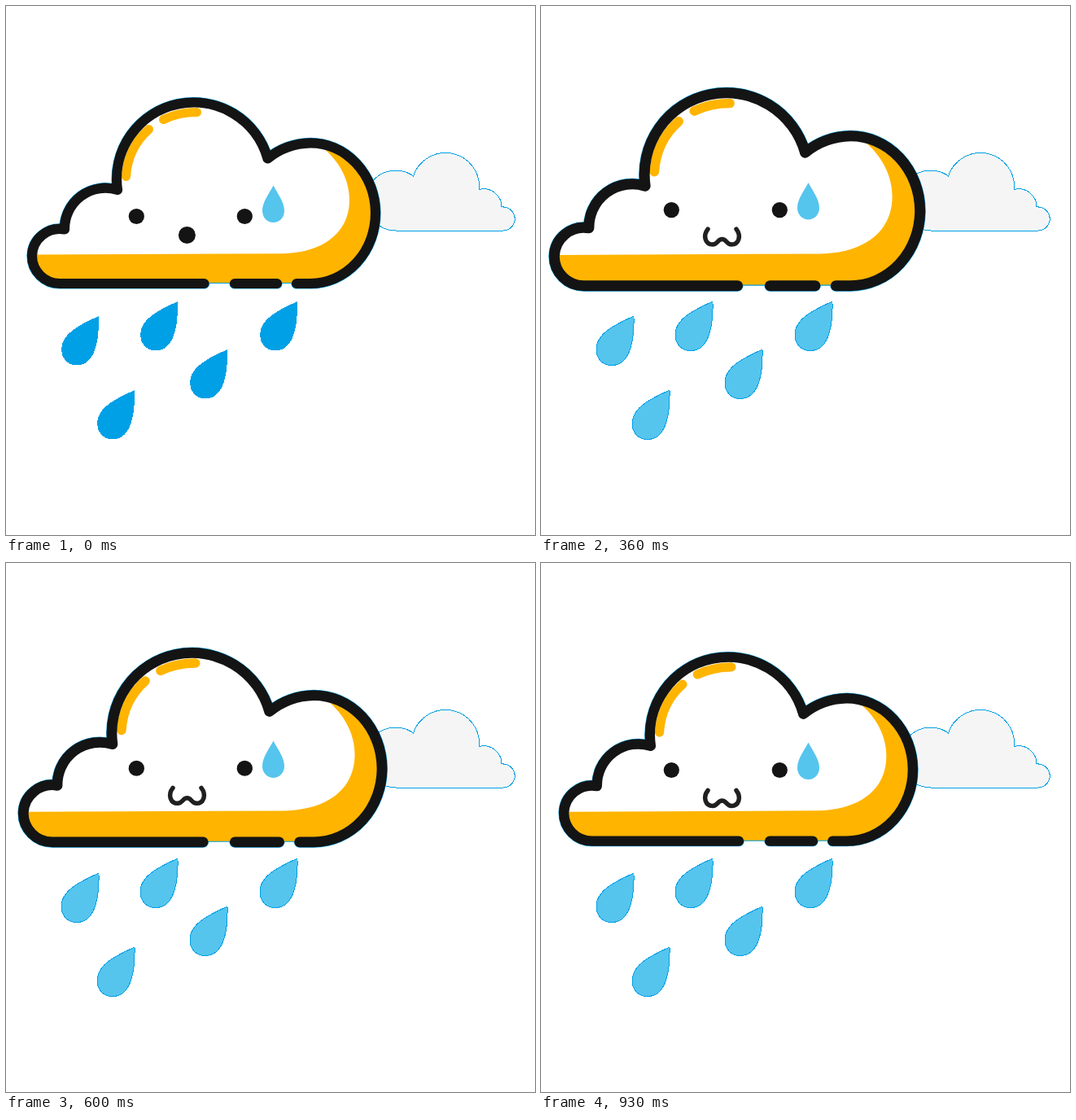
An HTML page that plays this animation: 650 px wide and 650 px high, repeating every 1200 ms.

```html
<!DOCTYPE html>
<html lang="en">
<head>
<meta charset="utf-8">
<title>Rain cloud</title>
<style>
  html, body { margin: 0; width: 100%; height: 100%; overflow: hidden; background: #fff; }
  svg { display: block; width: 100%; height: 100%; }
</style>
</head>
<body>
<svg viewBox="0 0 650 650" stroke-linecap="round" stroke-linejoin="round">
  <defs>
    <path id="drop" d="M114 381C92 391 68 402 68 422C68 434 76 441.5 87 441.5C104 441.5 115 424 114 381Z"/>
    <path id="body" d="M66 340.5A34 34 0 0 1 32 307A34 34 0 0 1 72 274.5A50 50 0 0 1 137 226A94.45 94.45 0 0 1 321.5 187.5A86 86 0 0 1 374 168.4A80 86.5 0 0 1 454 254A80 86.5 0 0 1 374 340.5Z"/>
    <path id="line" d="M357 341H374A80 86.5 0 0 0 454 254A80 86.5 0 0 0 374 168.4A86 86 0 0 0 321.5 187.5A94.45 94.45 0 0 0 137 226A50 50 0 0 0 72 274.5A34 34 0 0 0 32 307A34 34 0 0 0 66 341H243.5M281 341H333"/>
    <clipPath id="inside"><use href="#body"/></clipPath>
  </defs>

  <path fill="#f5f5f5" stroke="#00a0e6" shape-rendering="crispEdges" d="M479 276A37 37 0 1 1 500.5 209A41.62 41.62 0 0 1 581.5 225.5A22 22 0 0 1 609 247A14.55 14.55 0 1 1 611 276Z"/>

  <g id="cloud">
    <use href="#line" fill="none" stroke="#00a0e6" stroke-width="13.2"/>
    <use href="#body" fill="#ffb400" stroke="#00a0e6"/>
    <path fill="#fff" clip-path="url(#inside)" d="M20 305.6L340 304.2C388 303 422 280 422 238C422 213 409 190 389 174L370 100H20Z"/>
    <path fill="none" stroke="#ffb400" stroke-width="11" d="M147.5 209.5C149 186 159 166 175.5 151.5M193.5 139.5C206 133.5 220 130.5 234.5 130.5"/>
    <use href="#line" fill="none" stroke="#141414" stroke-width="12.2"/>
  </g>

  <g id="eyes" fill="#141414">
    <circle cx="160.3" cy="258.5" r="9.6"/>
    <circle cx="293.3" cy="258.5" r="9.6"/>
  </g>
  <path id="tear" fill="#55c5ee" d="M328.5 220.5C323 231 315 241 315 251.5C315 260 321 266 328.5 266C336 266 342 260 342 251.5C342 241 334 231 328.5 220.5Z"/>
  <circle id="gasp" cx="222.4" cy="281.5" fill="#141414"/>
  <path id="smile" fill="none" stroke="#202020" stroke-width="5.5" d="M205 279.5C198.5 288 202 298.5 211 298.5C217 298.5 217 292 222.5 292C228 292 228 298.5 234 298.5C243 298.5 246.5 288 240 279.5"/>

  <g id="rain" shape-rendering="crispEdges">
    <use href="#drop"/>
    <use href="#drop" x="97" y="-18"/>
    <use href="#drop" x="244" y="-18"/>
    <use href="#drop" x="158" y="41"/>
    <use href="#drop" x="44" y="91"/>
  </g>
</svg>
<script>
  const LOOP = 1200, STEP = 30, PEAK = 300, END = 930;
  const [cloud, eyes, tear, gasp, smile, rain] =
    ["cloud", "eyes", "tear", "gasp", "smile", "rain"].map(id => document.getElementById(id));

  const shiftY = (el, y) => el.setAttribute("transform", `translate(0 ${y})`);

  function draw(now) {
    const t = Math.min(Math.floor(now % LOOP / STEP) * STEP, END);
    const rising = t < PEAK;
    const up = t / PEAK, down = (t - PEAK) / (END - PEAK);
    // Rise from 0 to the peak, then settle to the resting value
    const move = (peak, rest) => rising ? peak * up : peak + (rest - peak) * down;

    const scale = 1 + move(0.07, 0.016);
    cloud.setAttribute("transform", `translate(274 300) scale(${scale}) translate(-274 -300)`);
    shiftY(eyes, move(-8.3, -4));
    shiftY(tear, move(-4, 0));

    gasp.setAttribute("r", 10.5 + 8 * up);
    gasp.setAttribute("visibility", rising ? "visible" : "hidden");
    smile.setAttribute("visibility", rising ? "hidden" : "visible");
    shiftY(smile, move(-6, 0));

    rain.setAttribute("fill", rising ? "#00a0e6" : "#55c5ee");
    rain.setAttribute("stroke", rising ? "none" : "#00a0e6");
  }

  function tick() {
    draw(performance.now());
    requestAnimationFrame(tick);
  }
  tick();
</script>
</body>
</html>
```
